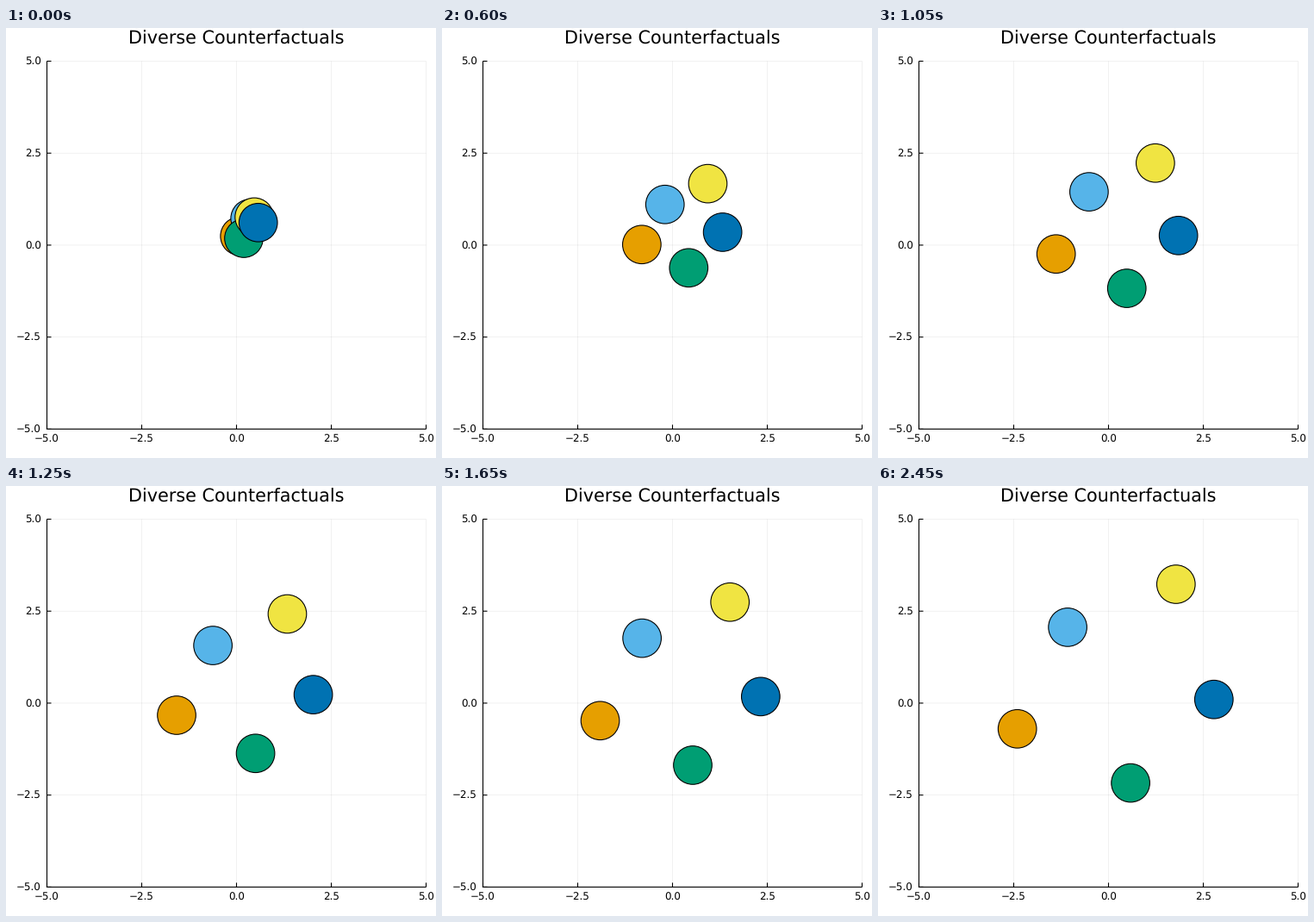
A matplotlib script for the animation above (2500 ms loop, 499x499 px).

```python
import numpy as np
import matplotlib.pyplot as plt
from matplotlib.animation import FuncAnimation
from matplotlib.patches import Circle

SIZE, DPI = 499, 64
PX = 72 / DPI  # points per pixel
FRAMES, INTERVAL = 50, 50
RADIUS = 22.3
BEND = 8    # frame where the discs have come apart
DECAY = 15  # frames over which the later drift slows down

plt.rcParams["font.family"] = "DejaVu Sans"
plt.rcParams["text.hinting"] = "none"

# Colour, then the disc's centre at the start, at the bend and at the end.
DISCS = [
    ("#E69F00", (271.2, 241.5), (247.2, 244.6), (161.7, 281.8)),
    ("#56B4E9", (283.2, 221.0), (267.2, 213.7), (220.1, 163.9)),
    ("#009E73", (276.0, 244.0), (284.8, 263.8), (293.1, 344.6)),
    ("#F0E442", (288.1, 219.4), (300.3, 195.2), (345.8, 114.0)),
    ("#0072B2", (292.7, 225.8), (311.6, 234.6), (389.8, 247.7)),
]


def progress(frame):
    """Shares of the first push apart and of the slowing drift after it."""
    push = min(frame / BEND, 1) ** 1.15
    after, total = max(frame - BEND, 0), FRAMES - 1 - BEND
    drift = np.log1p(after / DECAY) / np.log1p(total / DECAY)
    return push, drift


fig = plt.figure(figsize=(SIZE / DPI, SIZE / DPI), dpi=DPI, facecolor="white")
ax = fig.add_axes([0, 0, 1, 1])
ax.set_xlim(0, SIZE)
ax.set_ylim(SIZE, 0)
ax.axis("off")


def line(x, y, width=1.1, alpha=1.0):
    ax.plot(x, y, color="black", lw=width * PX, alpha=alpha, snap=False,
            solid_capstyle="butt", zorder=1)


def label(x, y, text, size, ha="center"):
    ax.text(x, y, text, fontsize=size * PX, ha=ha, va="baseline")


LEFT, RIGHT, TOP, BOTTOM = 47.5, 487.5, 38.5, 465.4

for value in np.linspace(-5, 5, 5):
    share = (value + 5) / 10
    x = LEFT + share * (RIGHT - LEFT)
    y = BOTTOM + share * (TOP - BOTTOM)
    name = f"{value:.1f}".replace("-", "−")
    line([x, x], [TOP, BOTTOM], 0.6, 0.09)
    line([LEFT, RIGHT], [y, y], 0.6, 0.09)
    line([x, x], [BOTTOM, BOTTOM - 5])
    line([LEFT, LEFT + 5], [y, y])
    label(x - 0.2, 480.5, name, 11.93)
    label(41.0, y + 4.5, name, 11.93, "right")
line([LEFT, LEFT], [TOP, BOTTOM + 0.5])
line([LEFT - 0.5, RIGHT], [BOTTOM, BOTTOM])
label((LEFT + RIGHT) / 2 - 0.3, 18.5, "Diverse Counterfactuals", 20.73)

circles = [ax.add_patch(Circle(start, RADIUS, fc=color, ec="black",
                               lw=1.1 * PX, zorder=3 + i))
           for i, (color, start, _, _) in enumerate(DISCS)]


def update(frame):
    push, drift = progress(frame)
    for circle, (_, *points) in zip(circles, DISCS):
        start, bend, end = map(np.array, points)
        circle.center = tuple(start + push * (bend - start)
                              + drift * (end - bend))
    return circles


anim = FuncAnimation(fig, update, frames=FRAMES, interval=INTERVAL,
                     repeat=True, repeat_delay=0, blit=False)
plt.show()
```
